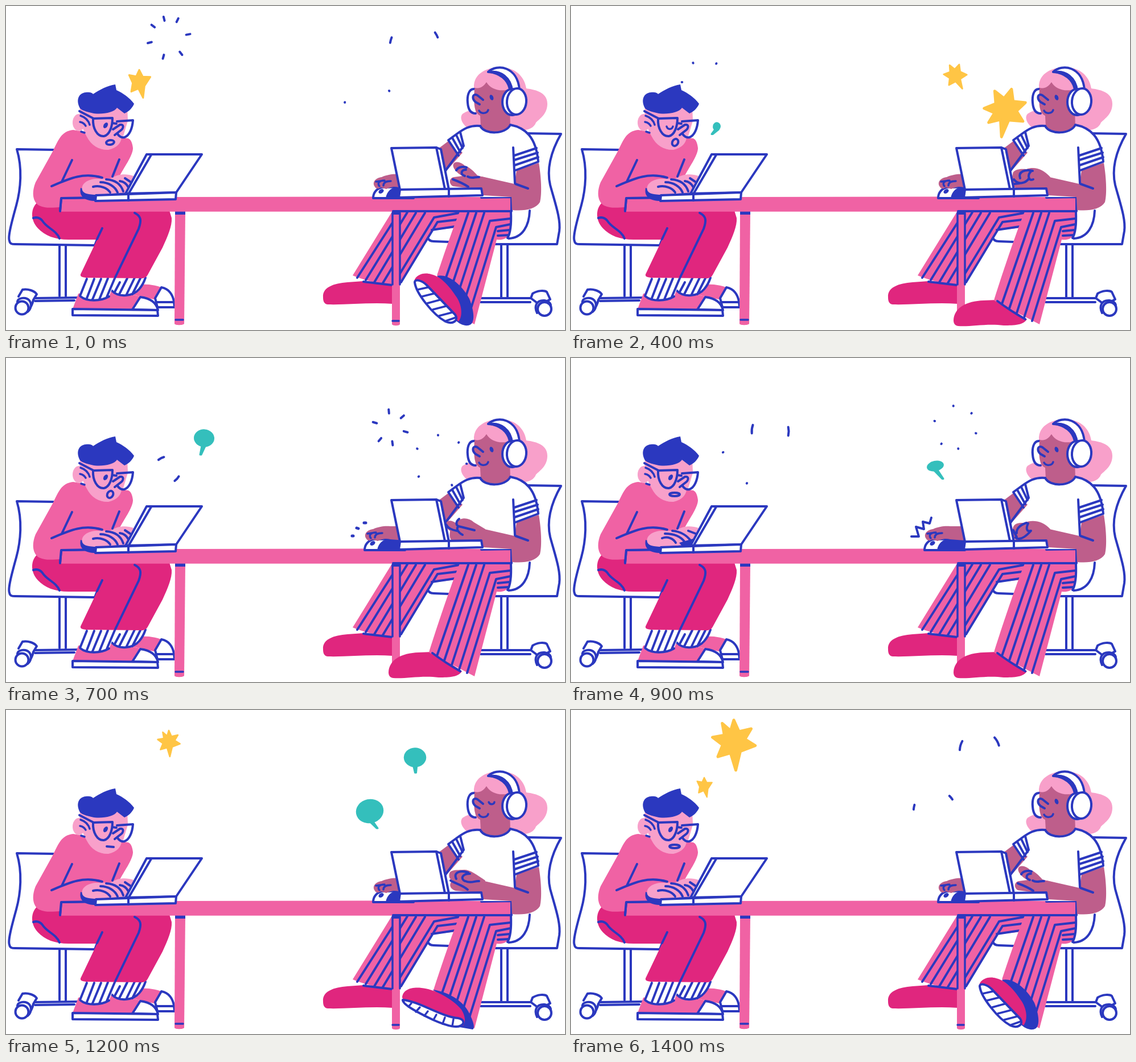
Animation of 982 by 570 pixels, one loop 1.5 s. Source, as an HTML page with a canvas:

```html
<!DOCTYPE html>
<html lang="en">
<head>
<meta charset="utf-8">
<title>Two people at a desk</title>
<style>
html, body { margin: 0; width: 100%; height: 100%; overflow: hidden; background: #fff; }
canvas { display: block; width: 982px; height: 570px; }
</style>
</head>
<body>
<canvas id="stage"></canvas>
<script>
const W = 982, H = 570, STEP = 100, STEPS = 15;
const BLUE = '#2b38bf', PINK = '#f062a4', DEEP = '#e0267e', LIGHT = '#f8a0ca',
      BROWN = '#be5e8b', YELLOW = '#ffc545', TEAL = '#34bfbc', WHITE = '#fff';
const canvas = document.getElementById('stage');
const ctx = canvas.getContext('2d');
const dpr = window.devicePixelRatio || 1;
canvas.width = W * dpr;
canvas.height = H * dpr;

const rad = deg => deg * Math.PI / 180;
const among = (i, ...list) => list.includes(i);

function paint(path, fill, stroke, width = 4) {
  if (fill) { ctx.fillStyle = fill; ctx.fill(path); }
  if (stroke) { ctx.strokeStyle = stroke; ctx.lineWidth = width; ctx.stroke(path); }
}
const shape = (d, fill, stroke, width) => paint(new Path2D(d), fill, stroke, width);
const line = (d, width) => shape(d, null, BLUE, width);
function oval(x, y, rx, ry, deg, fill, stroke, width) {
  const p = new Path2D();
  p.ellipse(x, y, rx, ry, rad(deg), 0, Math.PI * 2);
  paint(p, fill, stroke, width);
}

function chairs() {
  shape('M84 253L19 252C29 285 26 322 18 351C10 380 3 406 6 413C7 419 11 419 16 419L156 421L161 408', WHITE, BLUE);
  line('M94 422V510M105 422V510M51 514L128 513M51 519L120 518');
  shape('M22 511L29 499C38 497 50 501 54 507L48 517C46 527 43 531 39 534', WHITE, BLUE);
  shape('M20 521C20 513 35 511 41 518C46 524 44 533 38 538', WHITE, BLUE);
  oval(28, 531, 11.5, 11.5, 0, WHITE, BLUE);

  shape('M914 224L975 225C959 253 949 285 956 315C964 345 975 375 972 396L968 419L860 419', WHITE, BLUE);
  line('M870 421V512M881 421V512M834 514L922 514M834 521L921 521');
  shape('M922 514L925 506C934 500 946 500 950 503L956 516L938 526Z', WHITE, BLUE);
  shape('M933 540C927 528 932 517 946 518C952 519 956 521 957 526', WHITE, BLUE);
  oval(946, 533, 12, 12, 0, WHITE, BLUE);
  line('M740 406C742 412 746 414 751 414L777 415');
}

function leftLegs() {
  shape('M236 490C250 489 262 491 273 495L264 517L222 508Z', PINK);
  shape('M273 495C286 497 293 508 295 520L296 530L266 530L262 514Z', WHITE, BLUE);
  line('M264 521L295 521');
  shape('M127 506L117 533L222 534L240 512L185 500Z', PINK);
  shape('M197 476L185 500C198 513 222 510 234 498L246 474Z', WHITE);
  line('M185 500C198 514 223 511 234 498C240 491 243 484 245 478M200 486L191 503M213 479L199 507M226 478L211 509M237 477L222 507');
  shape('M139 476C132 496 128 508 131 512C142 521 166 521 181 511L195 476Z', WHITE);
  line('M131 511C142 520 166 520 181 511M142 480L130 510M155 480L142 514M167 480L152 516M179 479L164 516M191 479L177 512');
  shape('M236 512C253 514 264 522 267 535L222 534Z', WHITE, BLUE);
  shape('M117 533L266 535L267 545L117 544Z', WHITE, BLUE);
  shape('M57 344C43 354 42 376 56 391C68 404 86 411 110 411L160 411L131 472C130 476 134 477 140 478L240 479C246 478 248 475 250 471L275 425C284 405 292 387 291 373L284 350Z', DEEP);
  line('M48 373C54 371 60 373 64 378C72 391 88 394 94 409M169 391L160 410M226 364C238 370 238 378 233 392L192 477');
}

function farLeg() {
  shape('M557 512C556 495 575 488 600 486L628 484L680 491V524C640 521 600 526 565 525C558 524 557 518 557 512Z', DEEP);
  shape('M678 362L609 474C640 486 660 490 692 491L747 395L792 390L812 362Z', PINK);
  line('M690 364L617 478M705 363L632 482M720 364L647 486M736 364L661 489M796 364L752 372L684 484M792 376L758 380L694 486M788 388L748 394');
  line('M628 485L678 491');
}

function tableLegs() {
  shape('M297 362H315L313 559C311 562 297 562 296 559Z', PINK);
  shape('M297 361H315V367H297Z', BLUE);
  line('M298 552L311 552', 3.5);
  shape('M678 362H692V560C690 563 680 563 678 560Z', PINK);
  shape('M678 361H693V367H678Z', BLUE);
  line('M679 364V490M692 364V490M679 554L690 554', 3.5);
}

function flatFoot() {
  shape('M672 553C673 531 694 519 725 518L750 517L801 551C795 561 780 562 760 562C730 558 700 565 680 563C674 562 672 558 672 553Z', DEEP);
}
function tiltedFoot() {
  shape('M750 492C776 496 801 510 812 530C820 545 825 559 820 562L797 558L800 530Z', BLUE);
  shape('M696 506C697 492 712 487 730 489C750 490 785 508 800 527C807 538 808 550 803 556L700 512Z', DEEP);
  shape('M697 510C696 518 725 533 750 545C775 556 796 562 803 552C805 546 800 543 794 542C765 540 725 512 697 510Z', WHITE, BLUE);
  line('M712 516L707 522M727 523L720 531M741 530L735 538M756 536L751 545M771 541L767 552M786 544L784 556', 3.5);
}
function raisedFoot() {
  shape('M757 475C776 470 801 490 814 515C822 535 826 560 812 562C803 563 795 558 790 553L780 500Z', BLUE);
  shape('M717 484C720 472 735 468 747 472C762 475 777 490 790 510C801 525 803 545 795 555L735 500Z', DEEP);
  shape('M718 486C718 480 730 482 739 491L789 543C796 553 785 561 772 555C750 543 720 505 718 486Z', WHITE, BLUE);
  line('M723 499L741 495M731 511L751 506M740 523L762 517M750 534L773 528M761 545L784 539M773 554L790 548', 3.5);
}

function nearLeg(i) {
  const foot = among(i, 13, 14, 0) ? raisedFoot : among(i, 1, 2, 11, 12) ? tiltedFoot : flatFoot;
  const flat = foot === flatFoot;
  if (flat) flatFoot();
  ctx.save();
  if (!flat) ctx.clip(new Path2D(foot === raisedFoot
    ? 'M700 360H900V570H780L757 472H700Z' : 'M700 360H900V570H800L750 494H700Z'));
  shape('M797 362C785 390 758 470 743 518L823 560L862 411C880 413 887 403 887 385L888 362Z', PINK);
  line('M812 364L757 524M826 364L770 532M840 364L783 540M886 374L850 378L796 548M886 384L861 389L810 554M885 394L864 396M883 403L864 404');
  ctx.restore();
  if (flat) line('M749 519C765 531 780 541 798 551');
  else foot();
  line('M887 362C888 385 886 400 881 408');
  line('M920 360C919 386 908 408 883 409');
}

function tableTop() {
  shape('M96 338L300 336L888 335L889 361.7L95 361.7Z', PINK);
  line('M95 361L97 338L158 337M835 337L888 336L888 361L680 361');
}

function leftBody(i) {
  shape('M118 218C97 220 92 236 82 256L52 310C44 330 48 345 58 351C68 356 80 355 95 354V339L215 338L200 298C210 280 223 262 223 250C222 240 219 235 215 233L160 225Z', PINK);
  line('M95 360L97 338L158 337');
  shape('M131 320C128 335 138 343 158 343L215 336L212 325L160 328Z', BLUE);
  shape('M134 324C131 312 145 304 160 304C170 303 178 305 185 303C195 296 210 294 224 299L214 328L160 332C145 332 136 330 134 324Z', LIGHT);
  if (among(i, 8, 9, 10)) {
    shape('M190 325L214 318L214 332L196 332Z', BLUE);
    line('M160 317C170 313 180 318 184 325M165 309C182 309 193 314 200 324M178 304C193 305 204 313 210 321M206 304L219 309');
  } else {
    line('M153 318C165 315 178 320 183 328M166 310C180 310 192 318 196 328M176 305C192 306 202 314 206 326M200 308C207 309 212 313 215 319M209 303L218 309');
  }
  line('M80 317C110 304 135 292 169 302M116 271L98 309M199 270L187 300');
  shape('M247 261L344 261L299 328L210 330Z', WHITE, BLUE);
  line('M255 262L216 329');
  shape('M158 333L299 328L298 340L157 343Z', WHITE, BLUE);
  line('M215 331V342');
}

function leftHead(i) {
  oval(128, 205, 11, 15, 0, LIGHT);
  shape('M130 178C127 196 134 216 142 230C150 246 165 254 180 253C195 250 203 240 203 230L214 200L213 176Z', LIGHT);
  shape('M130 180C122 165 128 153 140 152C147 151 152 153 153 155C165 147 178 140 192 138L194 148C205 153 217 161 225 172C222 180 215 186 208 189L195 179C190 188 165 192 150 188C142 186 134 184 130 180Z', BLUE);
  shape('M195 203L223 201C222 215 217 228 208 231C203 232 198 229 196 225', WHITE);
  shape('M192 202L214 202L206 229L194 225Z', LIGHT);
  line('M129 185L154 198M187 206L194 207M153 198L187 197C187 212 182 227 172 229C160 230 152 215 153 198ZM195 203L223 201C222 215 217 228 208 231C203 232 198 229 196 225');
  shape('M188 217L200 209C207 207 208 215 200 220L191 227', LIGHT, BLUE);
  line('M131 193C140 196 145 202 147 209M130 204C135 205 138 207 140 211M132 221L138 223', 3.5);
  if (among(i, 4, 5)) line('M168 212C170 218 177 218 179 212', 3.5);
  else oval(175, 210, 3.5, 5.5, 30, BLUE);
  if (among(i, 11, 12)) line('M177 240L189 241');
  else if (among(i, 9, 10, 13, 14)) oval(182, 240, 9, 3, 0, LIGHT, BLUE);
  else if (i === 0) oval(183, 240, 7, 4, -8, LIGHT, BLUE);
  else oval(183, 240, 5, 6.5, 30, LIGHT, BLUE);
}

function rightHead(i) {
  shape('M822 142C822 121 840 110 862 108C890 106 910 120 914 145C926 147 951 150 951 172C951 190 938 198 931 205C926 219 905 222 890 214L810 214C797 203 797 191 805 188C810 184 818 184 822 184Z', LIGHT);
  shape('M823 146C812 145 810 160 811 170C812 184 818 189 825 189', WHITE, BLUE);
  shape('M823 145L844 133L884 145L886 212C878 225 845 226 834 212L833 193C823 188 821 175 823 145Z', BROWN);
  shape('M822 143C825 115 860 106 880 118L888 145C872 152 852 148 844 134C838 143 830 147 822 143Z', LIGHT);
  shape('M847 116C863 101 898 106 902 147L888 148C886 130 870 117 847 116Z', WHITE, BLUE);
  shape('M846 116C870 110 888 127 890 149L884 146C880 128 865 119 846 116Z', BLUE, BLUE, 2);
  oval(889, 169, 17, 23, 0, WHITE, BLUE);
  oval(897, 168, 17, 23, 5, WHITE, BLUE);
  shape('M838 165L828 157C819 153 818 163 825 169L832 173', BROWN, BLUE);
  if (among(i, 11, 12)) line('M848 162C850 167 857 167 858 162', 3.5);
  else oval(853, 161, 3.2, 5, -20, BLUE);
  line('M831 184C834 190 845 190 847 183', 3.5);
}

// Outline and finger lines for each gesture of the free hand.
const GESTURES = {
  open: ['M786 278C790 271 801 276 806 281C814 283 822 291 828 298L842 302L838 324L785 317C777 312 779 302 787 301L802 299C793 295 783 284 786 278Z',
    'M809 284C800 281 793 285 791 289M808 288C800 288 797 296 806 299M811 300C819 305 824 300 831 301M785 305C796 309 806 314 812 318'],
  loose: ['M780 285C786 280 796 282 805 281C815 281 826 289 842 300L838 322L790 318C777 314 779 303 785 300C778 298 777 290 780 285Z',
    'M812 286C798 281 785 286 791 297M815 288C801 288 798 297 806 301M807 301C817 306 824 300 831 301M781 300C791 306 802 308 811 316'],
  closed: ['M776 296C776 287 790 286 800 287C815 282 829 287 842 301L836 323L782 321C774 316 774 303 776 296Z',
    'M811 290C798 287 785 291 789 303M808 291C801 298 804 309 812 305M778 305C786 316 799 311 804 304M779 313L788 312'],
  point: ['M773 291C776 283 785 287 790 290C798 280 812 280 822 289L842 301L836 323L786 323C777 318 780 309 780 304C774 300 771 296 773 291Z',
    'M796 283C790 288 790 294 795 296L823 303M795 296C789 301 796 308 802 311M773 293C776 299 784 303 792 304'],
  fist: ['M776 300C778 289 790 290 796 290C810 284 828 286 842 301L836 323L784 322C774 316 774 307 776 300Z',
    'M800 290C788 294 782 301 783 308M803 291C798 302 802 306 808 304C799 314 789 322 781 316M777 303L783 315']
};
const GESTURE_ORDER = ['open', 'loose', 'closed', 'closed', 'point', 'fist', 'loose', 'open'];

function mouseHand(i) {
  const shift = { 6: -8, 7: -15, 8: -20, 9: -24, 10: -12 }[i] || 0;
  ctx.save();
  ctx.translate(shift, 0);
  shape('M645 338C645 328 652 320 662 319L716 318V338Z', WHITE, BLUE);
  shape('M667 338C669 325 678 318 692 317L716 318V338Z', BLUE);
  shape('M648 318C642 310 650 302 660 301C668 297 680 295 690 296L716 296V321L690 319C680 316 672 320 668 322L658 319C655 322 650 322 648 318Z', BROWN);
  line('M665 307C655 307 652 312 656 317M676 308C667 308 663 311 663 316M650 309L658 308', 3.5);
  oval(659, 326, 5, 3.5, -35, BLUE);
  ctx.restore();
  if (among(i, 8, 9)) line('M598 314L611 314L606 297L620 301L618 288L630 291L633 281');
  if (among(i, 7, 10)) line('M608 313L610 313M616 299L619 300M629 290L632 290', 5);
}

function rightBody(i) {
  shape('M833 211C815 209 803 217 792 225L803 248L772 291L778 336L888 336L897 289L935 275C935 240 925 217 886 209C878 226 841 227 833 211Z', WHITE);
  shape('M762 249L778 237L802 258L773 291L765 291Z', BROWN);
  shape('M833 211C815 209 803 217 792 225L777 236L795 263L804 246Z', WHITE);
  line('M795 263L777 236L792 225C803 217 815 209 833 211M804 246L771 291M784 232L798 257M791 227L802 250M798 222L804 246');
  shape('M897 289L936 276C940 300 942 330 938 345C930 358 910 361 889 359L888 336L838 333L812 310L836 300L893 313Z', BROWN);
  line('M833 211C841 227 878 226 886 209C912 214 931 230 935 274L895 289M891 249L894 312M893 263L932 250M893 271L934 258M894 280L935 266M895 313L917 321');
  const [outline, fingers] = GESTURES[GESTURE_ORDER[i === 0 ? 7 : (i + 1) >> 1]];
  shape(outline, BROWN);
  line(fingers);
  mouseHand(i);
  shape('M677 250L756 249L764 252L778 323L692 323Z', WHITE, BLUE);
  line('M756 249L771 322');
  shape('M692 323L835 321L837 333L690 337Z', WHITE, BLUE);
  line('M778 323V335');
}

// Stars grow for three steps, then burst into rays for three.
// The first point of each star is its long tail.
const STARS = [
  { start: 12, x: 286, y: 56, r: 39, burst: 38, points: [86, 137, 192, 238, 270, 323, 370], rays: [217, 256, 296, 350, 52, 106, 166] },
  { start: 14, x: 234, y: 134, r: 30, burst: 32, points: [76, 130, 215, 270, 335], rays: [180, 240, 303] },
  { start: 2, x: 763, y: 182, r: 38, burst: 38, points: [98, 142, 183, 240, 287, 341, 394], rays: [265, 209, 145, 64, 5, 314] },
  { start: 4, x: 675, y: 122, r: 40, burst: 31, points: [62, 123, 185, 241, 290, 357], rays: [197, 265, 319, 16, 82, 130] }
];

function star({ x, y, points }, r) {
  const p = new Path2D();
  const to = (deg, len) => p.lineTo(x + len * Math.cos(rad(deg)), y + len * Math.sin(rad(deg)));
  points.forEach((deg, k) => {
    const next = points[k + 1] || points[0] + 360;
    const lean = k === 0 ? 0.4 : k === points.length - 1 ? 0.6 : 0.5;
    to(deg, r * (k ? 0.98 : 1.28));
    to(deg + (next - deg) * lean, r * 0.52);
  });
  p.closePath();
  paint(p, YELLOW, YELLOW, r * 0.13);
}

function drawStar(s, i) {
  const age = (i - s.start + STEPS) % STEPS;
  if (age < 3) return star(s, s.r * [0.52, 0.74, 1][age]);
  if (age > 5) return;
  const mid = s.burst * [0.91, 1.1, 1.22][age - 3], half = [3.5, 2.5, 0.3][age - 3];
  for (const deg of s.rays) {
    const c = Math.cos(rad(deg)), n = Math.sin(rad(deg));
    line(`M${s.x + c * (mid - half)} ${s.y + n * (mid - half)}L${s.x + c * (mid + half)} ${s.y + n * (mid + half)}`);
  }
}

// Speech bubbles drift while growing, then pop into two arcs.
const BUBBLES = [
  { start: 4, from: [256, 212], to: [283, 197], r: 18, sizes: [0.36, 0.7, 1], squash: 1.3, tail: [-8, 17], marks: [243, 42] },
  { start: 6, from: [346, 153], to: [350, 129], r: 25, sizes: [0.35, 0.68, 1], squash: 0.7, tail: [-6, 36], marks: [187, 0] },
  { start: 9, from: [640, 190], to: [639, 178], r: 23, sizes: [0.62, 0.75, 0.9, 1], squash: 0.7, tail: [13, 29], marks: [191, 320] },
  { start: 11, from: [719, 95], to: [718, 72], r: 27, sizes: [0.4, 0.69, 1], squash: 0.7, tail: [1, 33], marks: [196, 331] }
];

function drawBubble({ start, from, to, r, sizes, squash, tail, marks }, i) {
  const age = (i - start + STEPS) % STEPS, pop = age - sizes.length;
  if (pop < 0) {
    const u = age / (sizes.length - 1), size = r * sizes[age];
    const x = from[0] + (to[0] - from[0]) * u, y = from[1] + (to[1] - from[1]) * u;
    const tx = x + tail[0], ty = y + Math.max(tail[1] * (0.4 + 0.6 * sizes[age]), size + 7);
    const tilt = Math.atan2(-tail[0], tail[1]) * 90 / Math.PI;
    const ry = size * 0.92 * (age ? 1 : squash), w = Math.min(3.5, size * 0.5);
    oval(x, y, size * 1.06, ry, tilt, TEAL);
    shape(`M${x - w} ${y + ry * 0.7}L${tx - 1} ${ty}L${tx + 1} ${ty}L${x + w} ${y + ry * 0.7}Z`, TEAL, TEAL, 3);
  } else if (pop < 3) {
    const ring = r * [1.3, 1.62, 1.94][pop], half = [r * 0.3, r * 0.18, 0.3][pop] / ring;
    for (const deg of marks) {
      const p = new Path2D();
      p.arc(to[0], to[1], ring, rad(deg) - half, rad(deg) + half);
      paint(p, null, BLUE);
    }
  }
}

function draw(i) {
  ctx.setTransform(dpr, 0, 0, dpr, 0, 0);
  ctx.fillStyle = WHITE;
  ctx.fillRect(0, 0, W, H);
  ctx.lineCap = ctx.lineJoin = 'round';
  chairs();
  leftLegs();
  farLeg();
  tableLegs();
  nearLeg(i);
  tableTop();
  leftBody(i);
  leftHead(i);
  rightHead(i);
  rightBody(i);
  STARS.forEach(s => drawStar(s, i));
  BUBBLES.forEach(b => drawBubble(b, i));
}

function tick() {
  draw(Math.floor(performance.now() / STEP) % STEPS);
  requestAnimationFrame(tick);
}
tick();
</script>
</body>
</html>
```
